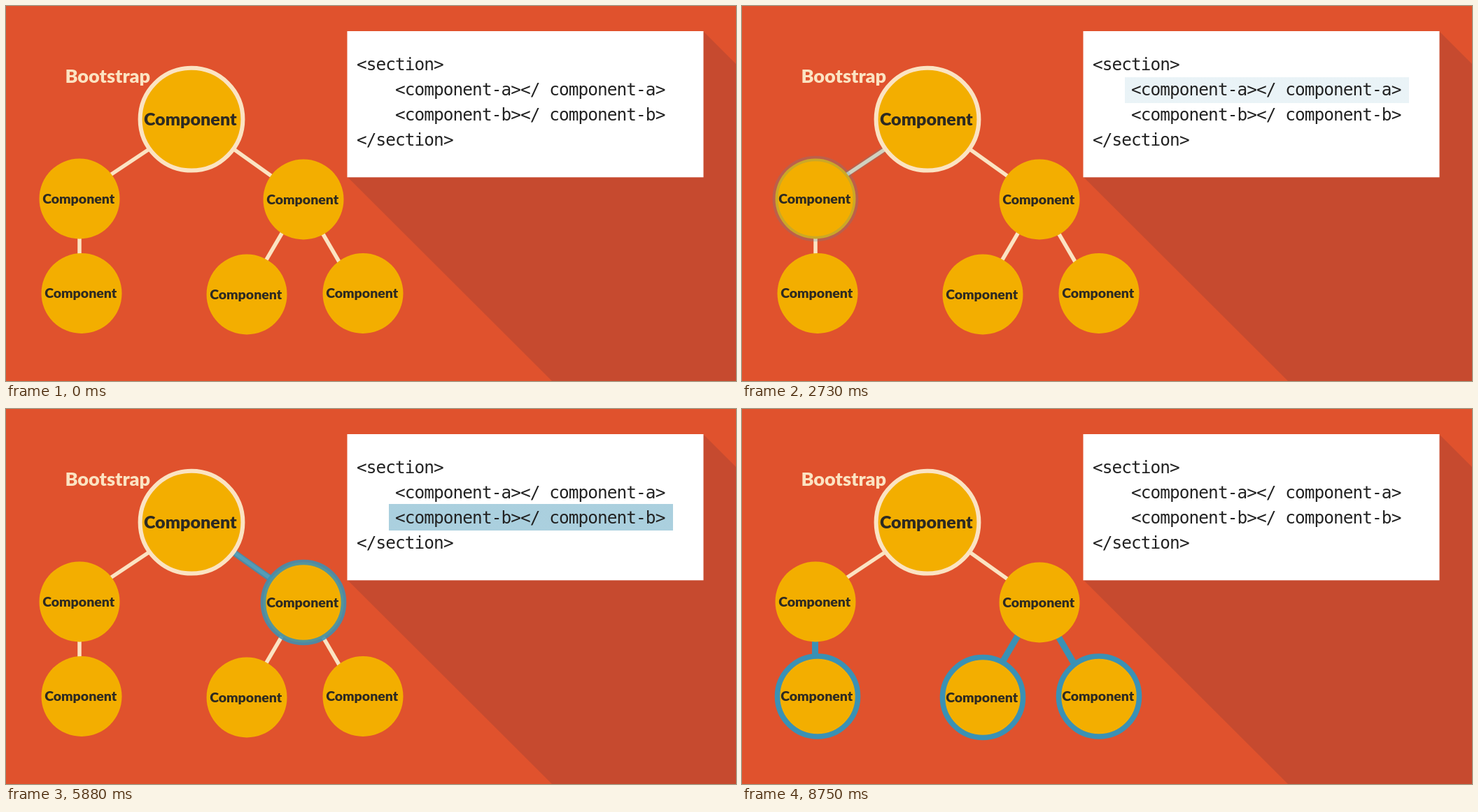
Recreate the animation shown at these times as an HTML page. Size 1043x537 px, loop 8820 ms.

```html
<!DOCTYPE html>
<html lang="en">
<head>
<meta charset="utf-8">
<title>Component tree</title>
<style>
  html, body { margin: 0; width: 100%; height: 100%; overflow: hidden; background: #e0522d; }
  svg { display: block; width: 100vw; height: 100vh; }
  .label { font-family: Lato, "Open Sans", sans-serif; font-weight: 900; fill: #2d2a22; text-anchor: middle; }
  .code { font: 24.4px "DejaVu Sans Mono", monospace; letter-spacing: -0.92px; fill: #222; white-space: pre; }
</style>
</head>
<body>
<svg id="stage" viewBox="0 0 1043 537" preserveAspectRatio="none"></svg>
<script>
const LOOP = 8820, STEP = 70, FADE_IN = 1000, FADE_OUT = 600, FEATHER = 20;
const CREAM = '#fbe3c2', YELLOW = '#f3ae00', BLUE = '#3a91b5', PALE_BLUE = '#9dc8d9';
const stage = document.getElementById('stage');

function add(parent, tag, attrs, text) {
  const el = document.createElementNS('http://www.w3.org/2000/svg', tag);
  for (const key in attrs) el.setAttribute(key, attrs[key]);
  if (text) el.textContent = text;
  parent.appendChild(el);
  return el;
}

const nodes = {
  left: { x: 105, y: 276 },
  right: { x: 425, y: 277 },
  leaf1: { x: 108, y: 411.5 },
  leaf2: { x: 344, y: 413 },
  leaf3: { x: 510, y: 411.5 }
};

// Each link runs from the parent's rim to the child's rim.
const links = {
  left: [206, 204, 149, 242],
  right: [324, 204, 380, 244],
  leaf1: [105, 331, 105, 357],
  leaf2: [395, 324, 371, 365],
  leaf3: [452, 325, 477, 368]
};

const phases = [
  { names: ['left'], start: 450, end: 2310, bar: [102, 37] },
  { names: ['right'], start: 2800, end: 5740, bar: [136, 38] },
  { names: ['leaf1', 'leaf2', 'leaf3'], start: 6890, end: Infinity }
];

function drawLink(parent, name, color, width) {
  const [x1, y1, x2, y2] = links[name];
  add(parent, 'line', { x1, y1, x2, y2, stroke: color, 'stroke-width': width });
}

function drawCard() {
  add(stage, 'path', { d: 'M488 245L780 537H1043V83L997 37Z', fill: '#c64a2f' });
  add(stage, 'rect', { x: 487.5, y: 36, width: 509, height: 209.3, fill: '#fff' });
  phases.filter(phase => phase.bar).forEach((phase, i) => {
    const id = 'wipe' + i;
    phase.wipe = add(stage, 'linearGradient', { id, gradientUnits: 'userSpaceOnUse', y1: 0, y2: 0 });
    add(phase.wipe, 'stop', { offset: 0, 'stop-color': PALE_BLUE });
    add(phase.wipe, 'stop', { offset: 1, 'stop-color': PALE_BLUE, 'stop-opacity': 0 });
    const [y, height] = phase.bar;
    phase.barEl = add(stage, 'rect', { x: 547, y, width: 406, height, fill: `url(#${id})` });
  });
  const lines = [
    [501, 92, '<section>'],
    [556, 128, '<component-a></ component-a>'],
    [556, 164, '<component-b></ component-b>'],
    [501, 199.5, '</section>']
  ];
  for (const [x, y, text] of lines) add(stage, 'text', { x, y, class: 'code' }, text);
}

function drawTree() {
  for (const name in links) drawLink(stage, name, CREAM, 5.5);
  const blueLinks = phases.map(phase => {
    const group = add(stage, 'g', { transform: 'translate(-0.5 0)' });
    phase.names.forEach(name => drawLink(group, name, BLUE, 9));
    return group;
  });
  add(stage, 'circle', { cx: 265, cy: 162.2, r: 73.4, fill: YELLOW, stroke: CREAM, 'stroke-width': 6 });
  for (const { x, y } of Object.values(nodes)) add(stage, 'circle', { cx: x, cy: y, r: 57.5, fill: YELLOW });
  phases.forEach((phase, i) => {
    const rings = add(stage, 'g', { fill: 'none', stroke: BLUE, 'stroke-width': 7.6 });
    for (const name of phase.names) add(rings, 'circle', { cx: nodes[name].x, cy: nodes[name].y, r: 57.5 });
    phase.groups = [blueLinks[i], rings];
  });
  add(stage, 'text', { x: 263.3, y: 170.7, class: 'label', 'font-size': 25.1 }, 'Component');
  for (const { x, y } of Object.values(nodes)) {
    add(stage, 'text', { x: x - 1.3, y: y + 6.7, class: 'label', 'font-size': 19.5 }, 'Component');
  }
  add(stage, 'text', { x: 145.3, y: 109.5, class: 'label', 'font-size': 27.1, style: `fill:${CREAM}` }, 'Bootstrap');
}

function ease(t) {
  t = Math.min(1, Math.max(0, t));
  return t * t * (3 - 2 * t);
}

function render(time) {
  const t = Math.floor((time % LOOP) / STEP) * STEP;
  for (const phase of phases) {
    const shown = ease((t - phase.start) / FADE_IN);
    const kept = phase.end === Infinity ? 1 : 1 - ease((t - phase.end) / FADE_OUT);
    phase.groups.forEach(group => group.setAttribute('opacity', shown * kept));
    if (!phase.bar) continue;
    const edge = 547 + shown * (406 + FEATHER);
    phase.wipe.setAttribute('x1', edge - FEATHER);
    phase.wipe.setAttribute('x2', edge);
    phase.barEl.setAttribute('opacity', shown > 0 ? kept : 0);
  }
}

drawCard();
drawTree();
render(0);
const began = performance.now();
requestAnimationFrame(function tick() {
  render(performance.now() - began);
  requestAnimationFrame(tick);
});
</script>
</body>
</html>
```
